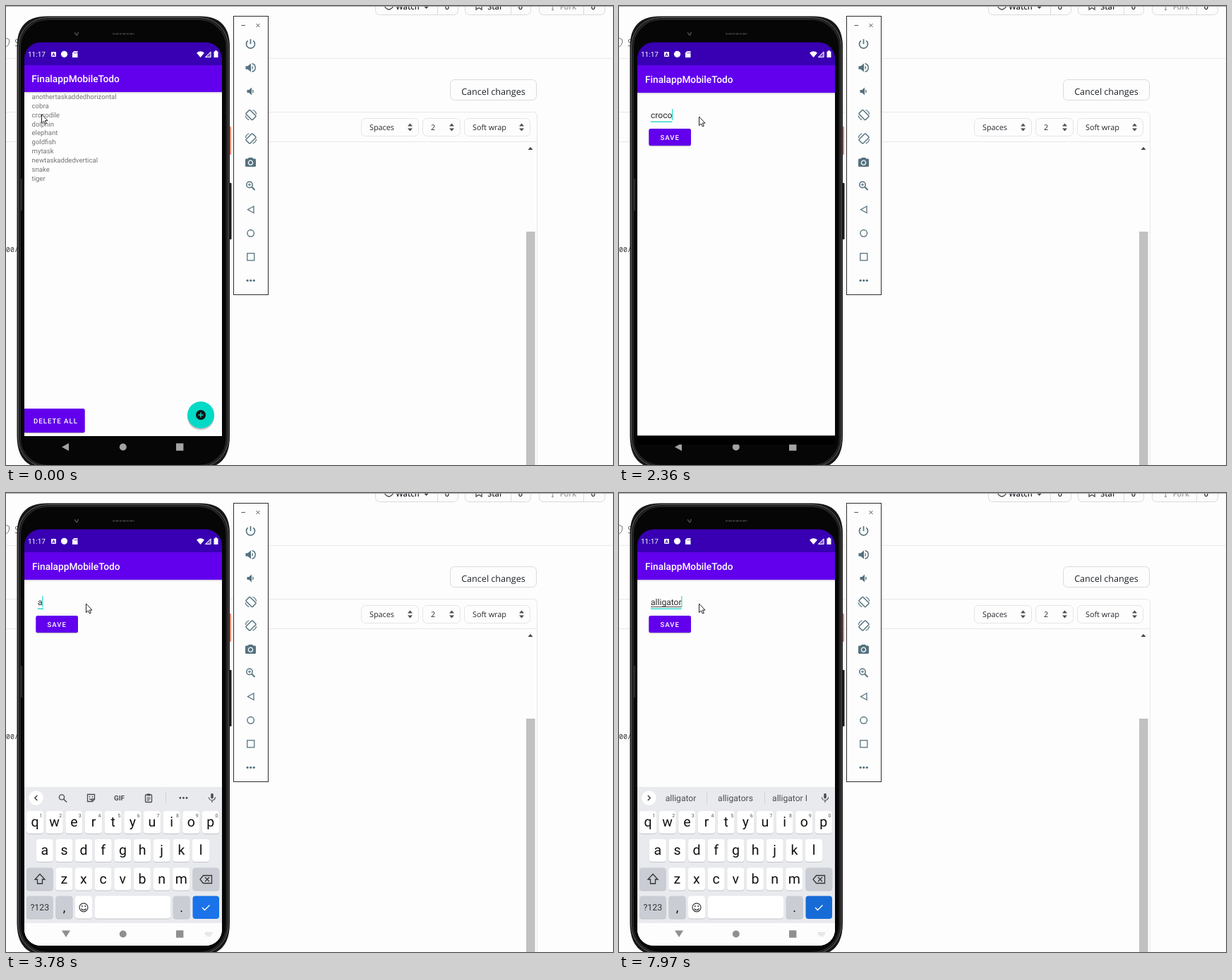
Recreate the animation shown at these times as an HTML page. Size 860x651 px, loop 8000 ms.

```html
<!DOCTYPE html>
<html lang="en">
<head>
<meta charset="utf-8">
<title>Todo app in an emulator</title>
<style>
  html, body { margin: 0; width: 100%; height: 100%; overflow: hidden; background: #fdfdfd; }
  svg { display: block; width: 860px; height: 651px; font-family: Roboto, sans-serif; text-rendering: geometricPrecision; }
  .ui { font-family: "Open Sans", sans-serif; }
  .line { fill: none; stroke: currentColor; }
</style>
</head>
<body>
<svg id="stage" viewBox="0 0 860 651" xmlns="http://www.w3.org/2000/svg"></svg>
<script>
const rect = (x, y, w, h, r, fill, more = "") =>
  `<rect x="${x}" y="${y}" width="${w}" height="${h}" rx="${r}" fill="${fill}" ${more}/>`;
const circle = (x, y, r, fill, more = "") =>
  `<circle cx="${x}" cy="${y}" r="${r}" fill="${fill}" ${more}/>`;
const path = (d, fill, more = "") => `<path d="${d}" fill="${fill}" ${more}/>`;
const line = (d, color, width = 1, more = "") =>
  path(d, "none", `stroke="${color}" stroke-width="${width}" ${more}`);
const text = (x, y, size, str, fill, more = "") =>
  `<text x="${x}" y="${y}" font-size="${size}" fill="${fill}" ${more}>${str}</text>`;
const at = (x, y, body, more = "") => `<g transform="translate(${x} ${y}) ${more}">${body}</g>`;
const MID = 'text-anchor="middle"';
const MEDIUM = 'font-weight="500"';
const UI = 'class="ui"';

function browser() {
  const border = 'stroke="#d9dade"';
  const counter = (x, w, split, label, color) =>
    rect(x + .5, -16.5, w, 29, 6, "#fcfcfc", border) +
    line(`M${split + .5} 0V12`, "#d9dade") +
    text(label[0], 5, 11, label[1], color, `${UI} ${MID} font-weight="600"`) +
    text(split + 14, 5, 11, "0", "#24292e", `${UI} ${MID} font-weight="600"`);
  const select = (x, w, label) =>
    rect(x + .5, 159.5, w, 25, 6, "#fdfdfd", 'stroke="#e4e5e8"') +
    text(x + 12, 176, 10.8, label, "#24292e", UI) +
    path(`M${x + w - 15} 170.5h7l-3.5 -4zm0 3h7l-3.5 4z`, "#4b4f54");
  return rect(0, 0, 860, 651, 0, "#fdfdfd") +
    line("M0 74.5H860", "#e9eaec") +
    line("M0 150.5H746Q752.5 150.5 752.5 157V651M0 192.5H752", "#e6e7ea") +
    counter(523, 117, 611, [569, "Watch"], "#24292e") +
    counter(650, 93, 715, [693, "Star"], "#24292e") +
    counter(755, 93, 818, [796.5, "Fork"], "#9a9da1") +
    line("M536 0Q542.5 10 549 0M666 0V5L670 2.500L674 5V0", "#444", 1.3) +
    path("M591.500 0h8l-4 4z", "#444") +
    line("M774.500 0V5", "#aaa", 1.3) + circle(774.5, 5, 1.5, "#aaa") +
    rect(629.5, 104.5, 122, 29, 6, "#fdfdfd", border) +
    text(690.5, 125.5, 12.6, "Cancel changes", "#1f2328", `${UI} ${MID}`) +
    select(503, 81, "Spaces") + select(590, 53, "2") + select(649, 93, "Soft wrap") +
    path("M739.500 204h7l-3.500 -4z", "#444") +
    rect(737, 320, 12.5, 331, 0, "#c1c1c1") +
    line("M0 45.5L4.500 47.500V52Q4 56 0 58", "#777") +
    text(12, 57, 14, "S", "#777", UI) +
    text(0, 348.5, 9.8, "00/", "#333", 'font-family="Noto Sans Mono, monospace"') +
    rect(0, 0, 860, 1, 0, "#a5a5a8");
}

function emulatorBar() {
  const c = "#56727f";
  const speaker = "M-7 -2.300h3L.5 -6V6L-4 2.300H-7z";
  const rotate = rect(-6.5, -4, 13, 8, 1, "none", `stroke="${c}" stroke-width="1.500" transform="rotate(45)"`) +
    line("M2.500 -7Q7 -5.500 7.600 -1M-2.500 7Q-7 5.500 -7.600 1", c, 1.3);
  return rect(322.5, 14.5, 49, 395, 0, "#fdfdfd", 'stroke="#2c2c2c"') +
    line("M333.500 27.5h5.500M354.500 25l5 5m0 -5l-5 5", "#555", 1) +
    at(346.5, 54, line("M0 -7V0M-3.700 -4.800A6 6 0 1 0 3.700 -4.800", c, 1.7)) +
    at(346.5, 87.5, path(speaker, c) + path("M2 -3Q5 0 2 3z", c) + line("M2 -5.700A5.800 5.800 0 0 1 2 5.700", c, 1.5)) +
    at(347, 121, path("M-5.500 -2h2.800L1 -5.500V5.500L-2.700 2H-5.500zM2.200 -3Q5.500 0 2.200 3z", c)) +
    at(347, 154.5, rotate) + at(347, 188, rotate, "scale(-1 1)") +
    at(346.5, 221.5, rect(-7.5, -5, 15, 11.5, 1.5, c) + path("M-4 -4.500l1.500 -2h5l1.500 2z", c) +
      circle(0, .8, 3.1, c, 'stroke="#fdfdfd" stroke-width="1.300"')) +
    at(345, 253.5, circle(0, 0, 4.2, "none", `stroke="${c}" stroke-width="1.500"`) +
      line("M3 3L7.500 7.500", c, 2) + line("M-2.200 0h4.400M0 -2.200v4.400", c, 1)) +
    line("M351 284v9.500l-8.500 -4.800z", c, 1.3) +
    circle(346.7, 322.3, 4.8, "none", `stroke="${c}" stroke-width="1.400"`) +
    rect(341.8, 350.8, 10, 10, 0, "none", `stroke="${c}" stroke-width="1.300"`) +
    [-4.6, 0, 4.6].map(d => circle(346.7 + d, 389.3, 1.6, c)).join("");
}

function phoneBody() {
  return rect(315, 171, 4, 40, 1, "#e9846c") + rect(315, 251, 4.5, 80, 1, "#1a1a1a") +
    path("M15.500 58Q15.500 14.500 58 14.500H275Q317 14.500 317 58V610Q317 656 275 656H58Q15.500 656 15.500 610z", "#161617") +
    rect(17.5, 16.5, 297.5, 637.5, 41, "none", 'stroke="#626264"') +
    rect(20, 19, 292.5, 633, 39, "#060607", 'stroke="#242426" stroke-width="2"') +
    line("M22 245V290", "#2a2a2c", 2) +
    line("M151 39.5H182", "#39393b", 2, 'stroke-dasharray="3 1 5 1"') +
    line("M97 37.5l3 4M102.500 37l-2 5", "#4a4a4c", 1.5);
}

function appBars(x, y) {
  const white = "#fff";
  return rect(26, 50, 280, 34, 0, "#3800b2") +
    text(31, 72, 10, "11:17", white) +
    rect(64, 65, 7, 7, 1, white) + text(67.5, 71, 6.5, "A", "#3800b2", `${MID} font-weight="700"`) +
    circle(82.5, 68.3, 4.6, white) +
    path("M96.500 64H101.500V73H94V66.500z", white) + line("M97 65.500v2m1.700 -2v2m1.700 -2v2", "#3800b2", .7) +
    path("M270 66.500Q275.500 62 281 66.500L275.500 73z", white) +
    path("M290.500 64V73H281.500z", "#fff", 'fill-opacity=".35"') + line("M290 65V72.500H282.500z", white) +
    path("M294.500 64.500h1.500v-1.200h3v1.200h1.500V73h-6z", white) +
    rect(26, y, 280, 1.6, 0, "#d9d6de") +
    rect(26, 84, 280, y - 84, 0, "#6200ee") +
    text(x, y - 14.2, 13.7, "FinalappMobileTodo", white, MEDIUM);
}

const button = (x, y, w, h, tx, label) =>
  rect(x, y + 1.2, w, h, 3, "#bdbdbd") + rect(x, y, w, h, 2.5, "#6200ee") +
  text(tx, y + h / 2 + 3.5, 9.6, label, "#fff", `${MEDIUM} letter-spacing="1"`);

function listPage() {
  const tasks = ["anothertaskaddedhorizontal", "cobra", "crocodile", "dolphin", "elephant",
    "goldfish", "mytask", "newtaskaddedvertical", "snake", "tiger"];
  return rect(26, 84, 280, 526, 0, "#fdfdfd") + appBars(36.3, 122) +
    tasks.map((task, i) => text(36.5, 132 + i * 12.87, 9.6, task, "#757575")).join("") +
    button(25, 571, 86.7, 34, 39, "DELETE ALL") +
    circle(276, 583, 19, "#000", 'opacity=".1"') + circle(276, 581.5, 19.3, "#000", 'opacity=".15"') +
    circle(276, 580, 19, "#03dac5") + circle(276, 580, 7, "#111") +
    line("M272.500 580h7M276 576.500v7", "#03dac5", 1.4);
}

function editPage() {
  return rect(26, 84, 280, 525.5, 0, "#fdfdfd") + rect(26, 609.5, 280, 12.5, 0, "#000") + appBars(37, 123) +
    button(42.3, 174, 59.7, 24, 58.5, "SAVE") +
    text(45, 159, 12.1, "", "#2a2a2a", 'id="field"') +
    rect(45, 163.6, 8, 1.2, 0, "#03cdbd", 'id="underline"') +
    rect(45, 161, 0, .9, 0, "#333", 'id="composing"') +
    rect(0, 146, 1, 16, 0, "#03dac5", 'id="caret"');
}

const navShapes = color => circle(165.8, 625.5, 5, color) + rect(241, 620.3, 10.4, 10.4, 0, color);

function keyboard() {
  const pitch = 27.65, ink = "#111", gray = "#cacdd4";
  const key = (x, y, w, fill = "#fff") => rect(x, y + 1, w, 32, 4, "#c3c5c9") + rect(x, y, w, 32, 4, fill);
  const row = (letters, x, y) => [...letters].map((ch, i) =>
    key(x + i * pitch, y, 24) + text(x + 12 + i * pitch, y + 22.3, 19.5, ch, ink, MID)).join("");
  const digits = [..."1234567890"].map((d, i) =>
    text(49.5 + i * pitch, 459.5, 7, d, "#555", MID)).join("");
  const icon = "#4a4d51";
  const tools = at(79, 431.5, circle(0, 0, 3.6, "none", `stroke="${icon}" stroke-width="1.400"`) + line("M2.500 2.500L7 7", icon, 1.6)) +
    at(120.5, 432.5, line("M-5 -5H5V2L2 5H-5zM5 1.500H1.500V5M-2.500 1Q0 3.500 2 1", icon, 1.3) +
      circle(-2, -1.7, .9, icon) + circle(2, -1.7, .9, icon)) +
    text(160.5, 436, 9.8, "GIF", icon, `${MID} font-weight="700"`) +
    at(202, 433, rect(-4.5, -5, 9, 10.5, 1, "none", `stroke="${icon}" stroke-width="1.300"`) +
      rect(-2.5, -6.5, 5, 3, 1, icon) + line("M-2.500 -1h5m-5 2h5m-5 2h3.500", icon)) +
    line("M226.500 425V440", "#cfd1d4") + [246.8, 251.4, 256].map(x => circle(x, 432.5, 1.4, icon)).join("") +
    line("M44.300 429l-3.500 3.500l3.500 3.500", "#333", 1.3);
  const words = [87.5, 165, 242].map(x => text(x, 437.2, 12.1, "", "#4a4d51", `${MID} class="word"`)).join("") +
    line("M124.500 424.500v16M206.500 424.500v16", "#cfd1d4") +
    line("M40.800 429l3.500 3.500l-3.500 3.500", "#333", 1.3);
  return rect(26, 417, 280, 193, 0, "#e8eaed") + circle(42.5, 432.5, 10.3, "#fff") +
    `<g id="tools">${tools}</g><g id="words">${words}</g>` +
    rect(290.2, 426, 3.6, 7.5, 1.8, icon) + line("M287.500 431.500a4.500 4.500 0 0 0 9 0M292 436v3", icon, 1.2) +
    row("qwertyuiop", 29, 451) + digits + row("asdfghjkl", 42.8, 491) + row("zxcvbnm", 70.3, 531.5) +
    key(29, 531.5, 37.7, gray) + line("M48 540.500l7 7.500h-3.500v6h-7v-6h-3.500z", "#333", 1.3) +
    key(264.5, 531.5, 37.7, gray) +
    line("M279.500 542.500H291.500V553.500H279.500L275 548zM282 545l6 6m0 -6l-6 6", "#333", 1.3) +
    key(29, 571.5, 37.7, gray) + text(47.8, 592, 12.4, "?123", "#333", MID) +
    key(70.5, 571.5, 24, gray) + text(82.5, 594, 18, ",", ink, MID) +
    key(98, 571.5, 24) + circle(110, 587.8, 6, "none", 'stroke="#333" stroke-width="1.200"') +
    circle(107.8, 586, 1, "#333") + circle(112.2, 586, 1, "#333") + line("M106.500 589.500q3.500 4 7 0", "#333", 1.2) +
    key(126, 571.5, 107) + key(236.7, 571.5, 24, gray) + text(248.7, 594, 18, ".", ink, MID) +
    rect(264.5, 571.5, 37.5, 32.5, 4, "#1a73e8", 'id="enter"') + line("M278 588l3.500 3.500l7 -7", "#fff", 1.4) +
    path("M79 620.500h12l-6 9.500z", "#8f8f8f") + navShapes("#8f8f8f") +
    line("M282 623.500h10M282 625.700h10M284 628h6", "#c4c4c4", 1.2, 'stroke-dasharray="1.500 .7"');
}

const stage = document.getElementById("stage");
stage.innerHTML = `<clipPath id="screen">${rect(26, 51.5, 280, 590.5, 23, "#000")}</clipPath>` +
  browser() + emulatorBar() + phoneBody() +
  `<g clip-path="url(#screen)">
    <g>${path("M89 620v11l-10 -5.500z", "#a3a3a3") + navShapes("#a3a3a3")}</g>
    <g id="list">${listPage()}</g>
    <g id="edit">${editPage()}</g>
    <g id="lightNav">${rect(26, 609.3, 280, 1.7, 0, "#111") + rect(26, 611, 280, 31, 0, "#fdfdfd") +
      line("M82 629.500l9 -4M161 627.500q4.500 4 9 0M241 630.500h10", "#ddd")}</g>
    <g id="keys">${rect(26, 610, 280, 32, 0, "#fdfdfd") + keyboard()}</g>
  </g>` +
  `<g id="mouse">${path("M.5 .5V13L3.400 10.400L5.400 14.500L7.300 13.600L5.300 9.600H9z", "#fff", 'stroke="#222"')}</g>`;

const el = Object.fromEntries([...stage.querySelectorAll("[id]")].map(node => [node.id, node]));
const wordNodes = stage.querySelectorAll(".word");

// Each track is a list of [start, value...] steps that hold until the next one.
const typed = [[0, "crocodile"], [1930, "crocodil"], [2360, "croco"], [2480, "c"], [2750, ""], [3400, "a"],
  [4040, "al"], [4170, "all"], [4420, "alli"], [4690, "allig"], [4830, "alliga"], [4970, "alligat"],
  [5540, "alligato"], [5810, "alligator"]];
const suggested = [[0, ""], [4040, "al", "all", "also"], [4170, "all", "all the", "allow"],
  [4560, "alli", "allied", "allies"], [4830, "allig", "alligator", "alligators"],
  [5110, "alligat", "alligator", "alligators"], [5680, "alligato", "alligator", "alligators"],
  [6080, "alligator", "alligators", "alligator I"]];
const pointer = [[0, 50, 153], [560, 56, 153], [690, 74, 152], [830, 92, 152], [980, 106, 155], [1130, 113, 156.5]];
const opening = [[0, 0, .9], [140, .3, .93], [280, .85, .98], [420, 1, 1]];
const caretShown = [[0, 0], [980, 1], [1530, 0], [1930, 1], [3280, 0], [3400, 1], [6480, 0], [7010, 1], [7410, 0], [7970, 1]];

const valueAt = (track, t) => track.findLast(step => step[0] <= t).slice(1);
const show = (node, on) => node.setAttribute("visibility", on ? "inherit" : "hidden");

function render(t) {
  const [word] = valueAt(typed, t), words = valueAt(suggested, t);
  const [alpha, scale] = valueAt(opening, t), [mx, my] = valueAt(pointer, t);
  const hasWords = words.length === 3;

  el.edit.setAttribute("opacity", alpha);
  el.edit.setAttribute("transform", `translate(166 331) scale(${scale}) translate(-166 -331)`);
  show(el.list, alpha < 1);
  el.mouse.setAttribute("transform", `translate(${mx} ${my})`);

  el.field.textContent = word;
  const width = word ? el.field.getComputedTextLength() : 0;
  el.underline.setAttribute("width", Math.max(8, width));
  el.composing.setAttribute("width", hasWords ? width : 0);
  el.caret.setAttribute("x", 45 + Math.max(0, width - .3));
  show(el.caret, valueAt(caretShown, t)[0]);

  show(el.lightNav, t >= 3640);
  show(el.keys, t >= 3780);
  show(el.tools, t >= 3780 && !hasWords);
  show(el.words, hasWords);
  el.enter.setAttribute("fill", hasWords ? "#176bd6" : "#1a73e8");
  wordNodes.forEach((node, i) => node.textContent = words[i] || "");
}

function loop() {
  render(performance.now() % 8000);
  requestAnimationFrame(loop);
}
loop();
</script>
</body>
</html>
```
